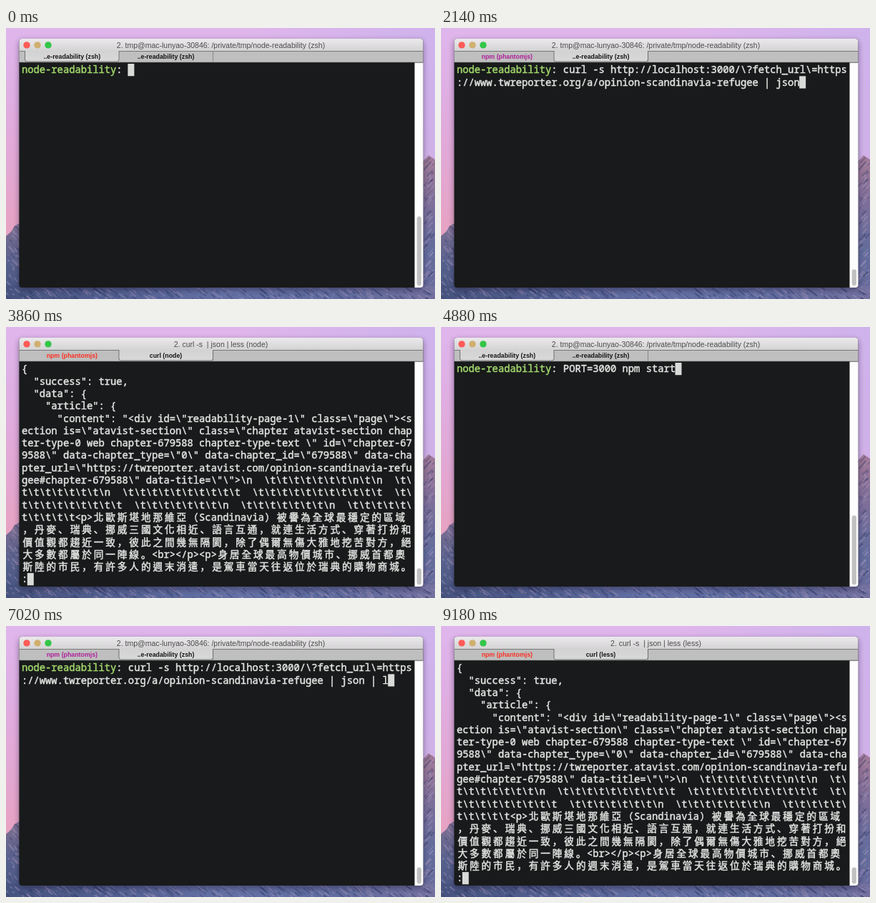
An HTML page with a canvas that plays this animation: 600 px wide and 379 px high, repeating every 9.2 s.

```html
<!DOCTYPE html>
<html lang="zh-Hant">
<head>
<meta charset="utf-8">
<title>Terminal session</title>
<style>
  html, body { margin: 0; width: 100%; height: 100%; overflow: hidden; background: #d0b0e4; }
  canvas { display: block; width: 600px; height: 379px; }
</style>
</head>
<body>
<canvas id="stage"></canvas>
<script>
const W = 600, H = 379, LOOP = 9200, TAKE = 4600;
const CELL = 8.27, ROW = 17.3, LEFT = 22, TOP = 50;
const MONO = '500 13.8px "Noto Sans Mono", "DejaVu Sans Mono", monospace';
const CJK = '500 13.6px "Noto Sans CJK JP", "Noto Sans CJK TC", sans-serif';
const SANS = '"Liberation Sans", Arial, sans-serif';
const INK = '#e2e4e1', GREEN = '#a2d76c';

const PROMPT = 'node-readability';
const START = 'PORT=3000 npm start';
const CURL = 'curl -s ';
const URL_ARG = 'http://localhost:3000/\\?fetch_url\\=https://www.twreporter.org/a/opinion-scandinavia-refugee';
const SHELL_TITLE = '2. tmp@mac-lunyao-30846: /private/tmp/node-readability (zsh)';
const SHELL_TAB = '..e-readability (zsh)';

const tabs = n => '\\t'.repeat(n);
const PAGE = [
  '{',
  '  "success": true,',
  '  "data": {',
  '    "article": {',
  '      "content": "<div id=\\"readability-page-1\\" class=\\"page\\"><s',
  'ection is=\\"atavist-section\\" class=\\"chapter atavist-section chap',
  'ter-type-0 web chapter-679588 chapter-type-text \\" id=\\"chapter-67',
  '9588\\" data-chapter_type=\\"0\\" data-chapter_id=\\"679588\\" data-cha',
  'pter_url=\\"https://twreporter.atavist.com/opinion-scandinavia-refu',
  'gee#chapter-679588\\" data-title=\\"\\">\\n  ' + tabs(7) + '\\n\\t\\n  \\t\\',
  't' + tabs(6) + '\\n  ' + tabs(10) + '  ' + tabs(11) + '  \\t\\',
  't' + tabs(8) + '  ' + tabs(7) + '\\n  ' + tabs(7) + '\\n  ' + tabs(5) + '\\',
  't' + tabs(4) + '<p>北歐斯堪地那維亞（Scandinavia）被譽為全球最穩定的區域',
  '，丹麥、瑞典、挪威三國文化相近、語言互通，就連生活方式、穿著打扮和',
  '價值觀都趨近一致，彼此之間幾無隔閡，除了偶爾無傷大雅地挖苦對方，絕',
  '大多數都屬於同一陣線。<br></p><p>身居全球最高物價城市、挪威首都奧',
  '斯陸的市民，有許多人的週末消遣，是駕車當天往返位於瑞典的購物商城。',
  ':'
];

const canvas = document.getElementById('stage');
const scale = window.devicePixelRatio || 1;
canvas.width = W * scale;
canvas.height = H * scale;
const g = canvas.getContext('2d');
const backdrop = document.createElement('canvas');
backdrop.width = canvas.width;
backdrop.height = canvas.height;

let seed = 7;
function random() {
  seed = (seed * 16807) % 2147483647;
  return seed / 2147483647;
}

function fade(c, x0, y0, x1, y1, colors) {
  const f = c.createLinearGradient(x0, y0, x1, y1);
  colors.forEach((color, i) => f.addColorStop(i / (colors.length - 1), color));
  return f;
}

function outline(c, points) {
  c.beginPath();
  points.forEach(([x, y]) => c.lineTo(x, y));
  c.closePath();
}

function rounded(c, x, y, w, h, r, fill) {
  c.beginPath();
  c.roundRect(x, y, w, h, r);
  c.fillStyle = fill;
  c.fill();
}

// A rock face: a filled outline with slanted light and dark streaks.
function rock(c, points, fill, x0, y0, w, h, count, lean) {
  c.save();
  outline(c, points);
  c.fillStyle = fill;
  c.fill();
  c.clip();
  for (let i = 0; i < count; i++) {
    const x = x0 + random() * w, y = y0 + random() * h, len = 3 + random() * 8;
    c.beginPath();
    c.moveTo(x, y);
    c.lineTo(x + lean * len, y + len * 0.8);
    c.lineWidth = 0.8 + random() * 1.6;
    c.strokeStyle = i % 2 ? 'rgba(168,152,190,.4)' : 'rgba(38,48,92,.35)';
    c.stroke();
  }
  c.restore();
}

function paintBackdrop() {
  const c = backdrop.getContext('2d');
  c.scale(scale, scale);
  c.fillStyle = fade(c, 0, 0, 0, 290, ['#dfb6ec', '#dfaee2', '#e2a8d4', '#e7a2c2']);
  c.fillRect(0, 0, W, H);
  c.fillStyle = fade(c, 330, 0, W, 0, ['rgba(204,178,236,0)', 'rgba(204,178,236,.85)']);
  c.fillRect(330, 0, 270, 190);
  rock(c, [[0, 291], [7, 285], [12, 277], [19, 273], [60, 300], [330, 345], [330, H], [0, H]],
    fade(c, 0, 275, 0, H, ['#7f6f92', '#56608c', '#46547f']), 0, 272, 20, 107, 70, 0.7);
  rock(c, [[300, 345], [560, 205], [583, 187], [591, 178], [600, 184], [600, H], [300, H]],
    fade(c, 0, 180, 0, H, ['#a27a98', '#7d6f9a', '#626c9c', '#6a6a9c']), 582, 178, 18, 200, 90, -0.7);
  rock(c, [[0, 360], [W, 360], [W, H], [0, H]],
    fade(c, 0, 0, W, 0, ['#46537e', '#525f90', '#6470a4', '#5f6b9e', '#72709f']), 0, 360, W, 20, 260, 1);
  c.shadowColor = 'rgba(20,10,40,.45)';
  c.shadowBlur = 9 * scale;
  c.shadowOffsetY = 3 * scale;
  rounded(c, 18.4, 15, 565, 348, 4, '#181a1b');
  c.shadowColor = 'transparent';
  rounded(c, 18.4, 15, 565, 18, [4, 4, 0, 0], fade(c, 0, 15, 0, 33, ['#ebe9eb', '#d3d2d3']));
  ['#fc5b57', '#d0b070', '#34c648'].forEach((color, i) => rounded(c, 24.3 + 15 * i, 19.2, 9.4, 9.4, 4.7, color));
  rounded(c, 571.5, 48, 12, 315, [0, 0, 4, 0], '#fdfdfd');
}

function label(text, x, y, font, color) {
  g.font = font + ' ' + SANS;
  g.fillStyle = color;
  g.textAlign = 'center';
  g.fillText(text, x, y);
}

function tabBar(active, names, colors) {
  g.fillStyle = '#bebfbe';
  g.fillRect(18.4, 32, 565, 16);
  g.fillStyle = '#777';
  g.fillRect(18.4, 32, 565, 1);
  g.fillStyle = '#3c3d3c';
  g.fillRect(18.4, 47.8, 565, 0.8);
  g.fillStyle = '#858685';
  g.fillRect(289, 33, 1, 14);
  const x = active ? 158 : 26.5, w = 131.5;
  rounded(g, x, 32, w, 15, [0, 0, 3, 3], fade(g, 0, 32, 0, 47, ['#d3d2d3', '#d9d9d9']));
  g.beginPath();
  g.moveTo(x, 32);
  g.lineTo(x, 44);
  g.quadraticCurveTo(x, 47, x + 3, 47);
  g.lineTo(x + w - 3, 47);
  g.quadraticCurveTo(x + w, 47, x + w, 44);
  g.lineTo(x + w, 32);
  g.strokeStyle = '#5c5d5c';
  g.lineWidth = 0.8;
  g.stroke();
  names.forEach((name, i) => label(name, 92.3 + 131.2 * i, 43.2, 'bold 8.8px', colors[i]));
}

const isWide = ch => ch > '\u2fff';

// Writes on the cell grid and returns the column after the text.
function put(text, row, col, color) {
  g.textAlign = 'left';
  g.fillStyle = g.strokeStyle = color;
  g.lineWidth = 0.5;
  g.lineJoin = 'round';
  const y = TOP + row * ROW + 13.3;
  for (const ch of text) {
    const wide = isWide(ch);
    if (ch !== ' ') {
      const x = LEFT + col * CELL + (wide ? 1.5 : 0);
      g.font = wide ? CJK : MONO;
      g.fillText(ch, x, y);
      g.strokeText(ch, x, y);
    }
    col += wide ? 2 : 1;
  }
  return col;
}

function cursor(row, col) {
  g.fillStyle = '#d8dbd8';
  g.fillRect(LEFT + col * CELL - 0.5, TOP + row * ROW, 9, 17.2);
}

function commandLine(command, entered) {
  put(PROMPT, 0, 0, GREEN);
  const line = ': ' + command, first = 66 - PROMPT.length;
  let row = 0, col = put(line.slice(0, first), 0, PROMPT.length, INK);
  if (line.length > first) {
    row = 1;
    col = put(line.slice(first), 1, 0, INK);
  }
  if (entered) cursor(row + 1, 0);
  else cursor(row, col);
}

function typed(text, t, from, to) {
  const p = Math.min(1, Math.max(0, (t - from) / (to - from)));
  return text.slice(0, Math.floor(p * text.length + 1e-6));
}

function draw(t) {
  g.setTransform(1, 0, 0, 1, 0, 0);
  g.drawImage(backdrop, 0, 0);
  g.scale(scale, scale);

  const second = t >= 640, running = t >= 2700;
  const program = t < 4200 ? 'node' : 'less';
  const title = running ? `2. curl -s  | json | less (${program})` : SHELL_TITLE;
  label(title, 300.5, 27.6, '10.5px', '#4d4c4d');
  tabBar(second ? 1 : 0,
    [second ? 'npm (phantomjs)' : SHELL_TAB, running ? `curl (${program})` : SHELL_TAB],
    [!second ? '#161616' : running ? '#fb3025' : '#b01f9c', '#161616']);
  const thumb = second ? 337.5 : 263.5;
  rounded(g, 574.7, thumb, 6.2, 360.3 - thumb, 3.1, '#c1c1c1');

  if (!second) {
    commandLine(typed(START, t, 40, 260), t >= 400);
  } else if (t < 2900) {
    const command = typed(CURL, t, 740, 940) + (t >= 1040 ? URL_ARG : '') +
      typed(' | json', t, 1160, 1440) + typed(' | less', t, 2200, 2520);
    commandLine(command, running);
  } else if (t < 3600) {
    cursor(0, 0);
  } else {
    PAGE.forEach((line, i) => put(line, i, 0, INK));
    cursor(17, 1);
  }
}

paintBackdrop();
const began = performance.now();
function tick() {
  draw((performance.now() - began) % LOOP % TAKE);
  requestAnimationFrame(tick);
}
tick();
</script>
</body>
</html>
```
